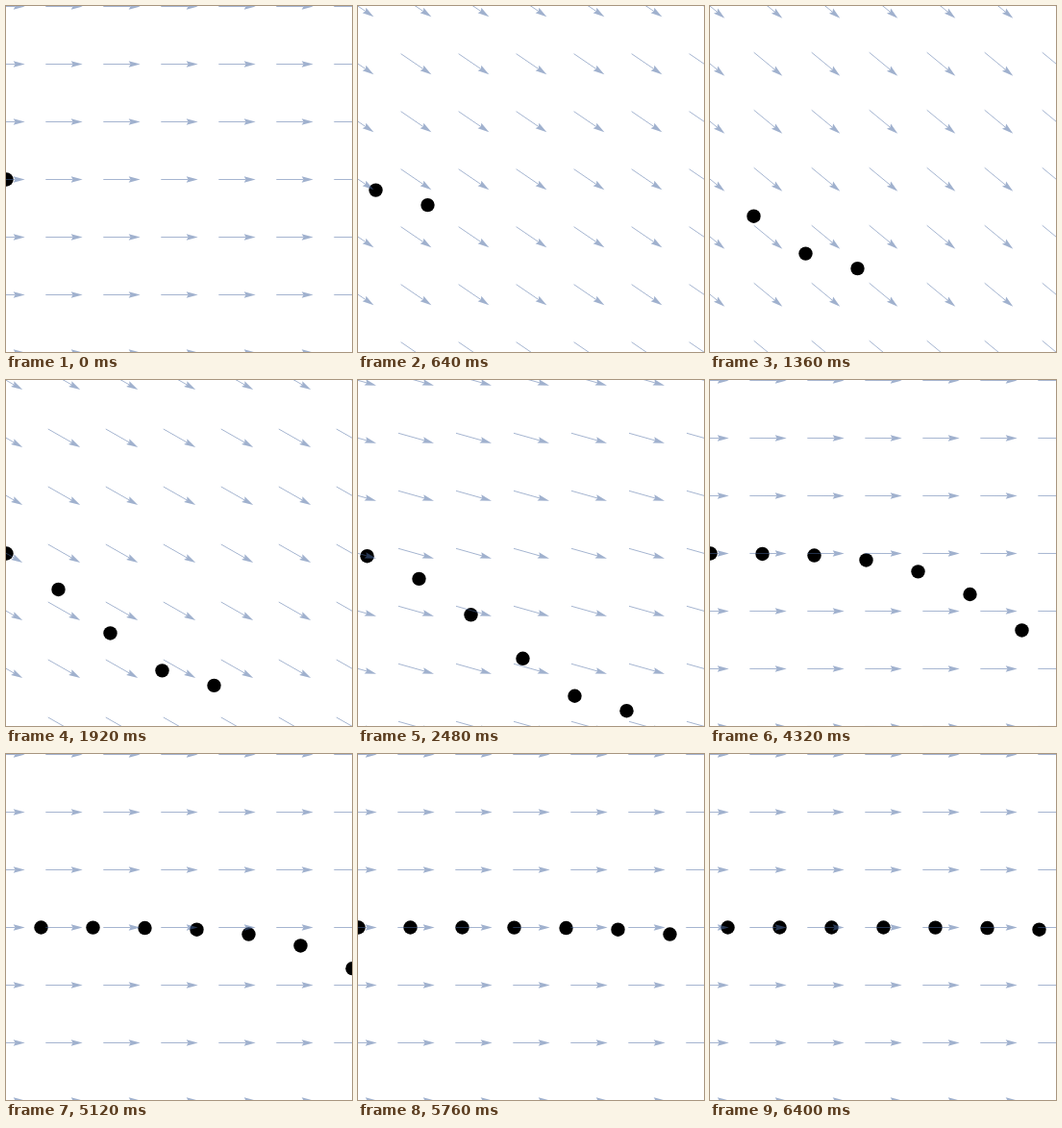
Animation, 360 px wide and 360 px high, one loop 6.48 s. Source, as an HTML page:

```html
<!DOCTYPE html>
<html>
<head>
<meta charset="utf-8">
<title>Unsteady flow and streakline</title>
<style>
html, body { margin: 0; width: 100%; height: 100%; overflow: hidden; background: #fff; }
svg { display: block; width: 100vw; height: 100vh; }
</style>
</head>
<body>
<svg viewBox="0 0 360 360">
  <rect width="360" height="360" fill="#fff"/>
  <g id="dots"></g>
  <g id="field" opacity=".52">
    <path id="lines" fill="none" stroke="#4a6aa2" stroke-width=".95"/>
    <path id="heads" fill="#4a6aa2"/>
  </g>
</svg>
<script>
const STEP = 80, STEPS = 81, EVERY = 6;
const UNIT = 180;   // pixels per unit of length
const DT = 0.05;    // flow time per step
const MID = 180.5, GRID = 60, HALF = 19.2;
const $ = id => document.getElementById(id);

// Flow velocity is (1, drop'(t)).
const drop = t => 1 - Math.exp(-t * t);
const slope = t => 2 * t * Math.exp(-t * t);

const dots = Array.from({ length: Math.ceil(STEPS / EVERY) }, () => {
  const dot = document.createElementNS('http://www.w3.org/2000/svg', 'circle');
  dot.setAttribute('r', 7.2);
  return $('dots').appendChild(dot);
});

function drawField(t) {
  const a = Math.atan(slope(t)), c = Math.cos(a), s = Math.sin(a);
  let lines = '', heads = '';
  for (let i = 0; i <= 6; i++) {
    for (let j = 0; j <= 6; j++) {
      const x = i * GRID + 0.5, y = j * GRID + 0.5;
      const at = (u, v) => (x + u * c - v * s).toFixed(2) + ' ' + (y + u * s + v * c).toFixed(2);
      lines += `M${at(-HALF, 0)}L${at(HALF - 10.2, 0)}`;
      heads += `M${at(HALF, 0)}L${at(HALF - 12, 3.3)}L${at(HALF - 10.2, 0)}L${at(HALF - 12, -3.3)}Z`;
    }
  }
  $('lines').setAttribute('d', lines);
  $('heads').setAttribute('d', heads);
}

function drawDots(n) {
  const t = n * DT;
  dots.forEach((dot, k) => {
    const born = k * EVERY * DT, age = t - born;
    dot.setAttribute('visibility', k * EVERY <= n ? 'visible' : 'hidden');
    dot.setAttribute('cx', 0.5 + UNIT * age);
    dot.setAttribute('cy', MID + UNIT * (drop(t) - drop(born)));
  });
}

let shown = -1;
function draw(ms) {
  const n = Math.floor(ms / STEP) % STEPS;
  if (n === shown) return;
  shown = n;
  drawField(n * DT);
  drawDots(n);
}

const start = performance.now();
function tick() {
  draw(performance.now() - start);
  requestAnimationFrame(tick);
}
tick();
</script>
</body>
</html>
```
